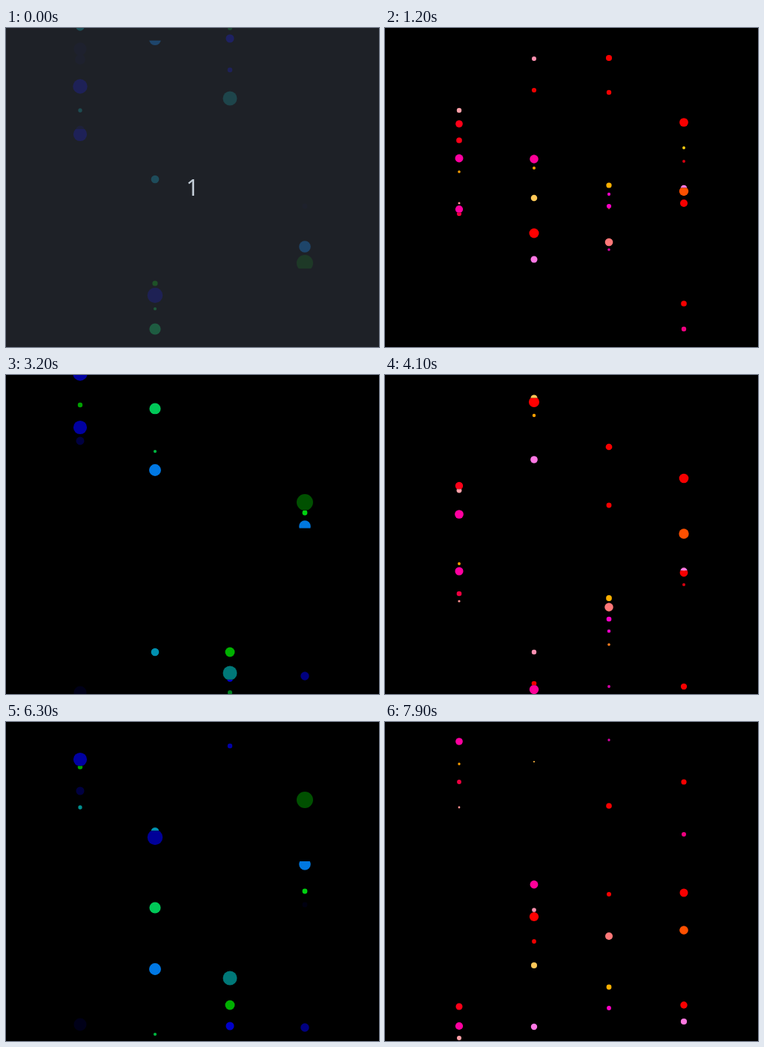
Animation of 498 by 426 pixels, one loop 8 s. Source, as an HTML page with a canvas:

```html
<!DOCTYPE html>
<html lang="en">
<head>
<meta charset="utf-8">
<title>Rising spheres</title>
<style>
html, body { margin: 0; width: 100%; height: 100%; overflow: hidden; background: #000; }
canvas { position: absolute; left: 0; top: 0; }
#count {
  position: absolute; left: 0; top: 0; width: 498px; height: 426px;
  background: rgba(43, 48, 56, .7);
}
#count text { font: 30px "Noto Sans", "Open Sans", sans-serif; fill: #c4ced8; }
</style>
</head>
<body>
<canvas id="stage" width="498" height="426"></canvas>
<svg id="count" viewBox="0 0 498 426"><text x="249" y="224" text-anchor="middle">1</text></svg>
<script>
const ctx = document.getElementById('stage').getContext('2d');
const count = document.getElementById('count');
const LOOP = 8000, FRAME = 100, START_TICK = 92, BOTTOM = 428;

// Each ball: y at START_TICK, ticks per lap, radius, colour, how late its red fades
const columns = [
  { x: 99, speed: 4, balls: [
    [110, 120, 3, 'ffa0a8', .35], [128, 117, 4.5, 'ff0018', 0],
    [150, 119, 3.6, 'ff0018', 0], [174, 116, 5.1, 'ff00a0', .53],
    [192, 122, 1.7, 'ffa000', .7], [234, 123, 1.4, 'ff9090', .55],
    [242, 117, 4.8, 'ff00a0', .53], [248, 120, 2.9, 'f00040', .8]] },
  { x: 199, speed: 7, balls: [
    [41, 69, 2.8, 'ff90b0', .38], [83, 69, 2.9, 'f00000', 0],
    [175, 66, 5.4, 'ff0098', 0], [187, 70, 1.9, 'ffa000', .7],
    [227, 67, 4, 'ffc858', 0], [228, 71, 1.1, 'ffb840', 0],
    [274, 65, 6.1, 'ff0000', .77], [309, 67, 4.2, 'ff78e4', 0]] },
  { x: 299, speed: 8, balls: [
    [40, 59, 3.8, 'f80000', 0], [86, 60, 3, 'f80000', 0],
    [210, 60, 3.4, 'ffb000', .72], [222, 61, 2, 'f000c8', 0],
    [238, 60, 2.9, 'ff00c8', .52], [240, 61, 1.6, 'ff8020', .38],
    [286, 58, 5, 'ff7878', .76], [296, 61, 1.7, 'd800a8', 0]] },
  { x: 399, speed: 6, balls: [
    [126, 77, 5.5, 'f80000', 0], [160, 82, 1.8, 'ffd010', .52],
    [178, 82, 1.8, 'd80010', .45], [214, 79, 4.1, 'ff78e0', 0],
    [218, 76, 5.8, 'ff5000', 0], [234, 78, 4.7, 'f80000', 0],
    [368, 79, 3.6, 'f80000', 0], [402, 80, 3, 'f00080', .53]] }
];

const clamp = v => Math.max(0, Math.min(1, v));

// The clock runs in 100 ms steps and skips ahead slightly once
const tickAt = step => Math.round(7.69 * step + (step >= 18 ? 6.1 : 0));

function pulseAt(tick) {
  const wave = (1 + Math.cos((tick - 5) / 240 * 2 * Math.PI)) / 2;
  return 1 + .9 * wave ** 1.5;
}

function tint(hex, red) {
  const n = parseInt(hex, 16);
  return `rgb(${Math.round((n >> 16) * red)},${n >> 8 & 255},${n & 255})`;
}

// Spheres on one axis meet in a plane seen edge-on, so both are cut at that height
function cutOverlaps(balls) {
  for (const a of balls) for (const b of balls) {
    const d = b.y - a.y;
    if (d <= Math.abs(a.r - b.r) || d >= a.r + b.r) continue;
    const cut = a.y + (d * d + a.r * a.r - b.r * b.r) / (2 * d);
    a.low = Math.min(a.low, cut);
    b.high = Math.max(b.high, cut);
  }
}

function drawBall(x, { y, r, high, low, color }) {
  if (low <= high) return;
  ctx.save();
  ctx.beginPath();
  ctx.rect(x - r - 2, high, 2 * r + 4, low - high);
  ctx.clip();
  ctx.beginPath();
  ctx.arc(x, y, r, 0, 2 * Math.PI);
  ctx.fillStyle = color;
  ctx.fill();
  ctx.restore();
}

function draw(ms) {
  const step = Math.floor(ms / FRAME);
  const tick = tickAt(step);
  const pulse = pulseAt(tick);
  ctx.fillStyle = '#000';
  ctx.fillRect(0, 0, 498, 426);
  for (const { x, speed, balls } of columns) {
    const placed = balls.map(([y0, lap, size, hex, late]) => {
      const span = lap * speed, top = BOTTOM - span;
      const offset = y0 - speed * (tick - START_TICK) - top;
      const y = top + ((offset % span) + span) % span;
      const r = size * pulse;
      const color = tint(hex, clamp(late + (1.477 - pulse) * 8));
      return { y, r, color, high: y - r - 2, low: y + r + 2 };
    });
    cutOverlaps(placed);
    placed.sort((a, b) => a.r - b.r).forEach(ball => drawBall(x, ball));
  }
  count.style.display = step < 1 ? 'block' : 'none';
}

const begin = performance.now();
function loop() {
  draw((performance.now() - begin) % LOOP);
  requestAnimationFrame(loop);
}
draw(0);
requestAnimationFrame(loop);
</script>
</body>
</html>
```
